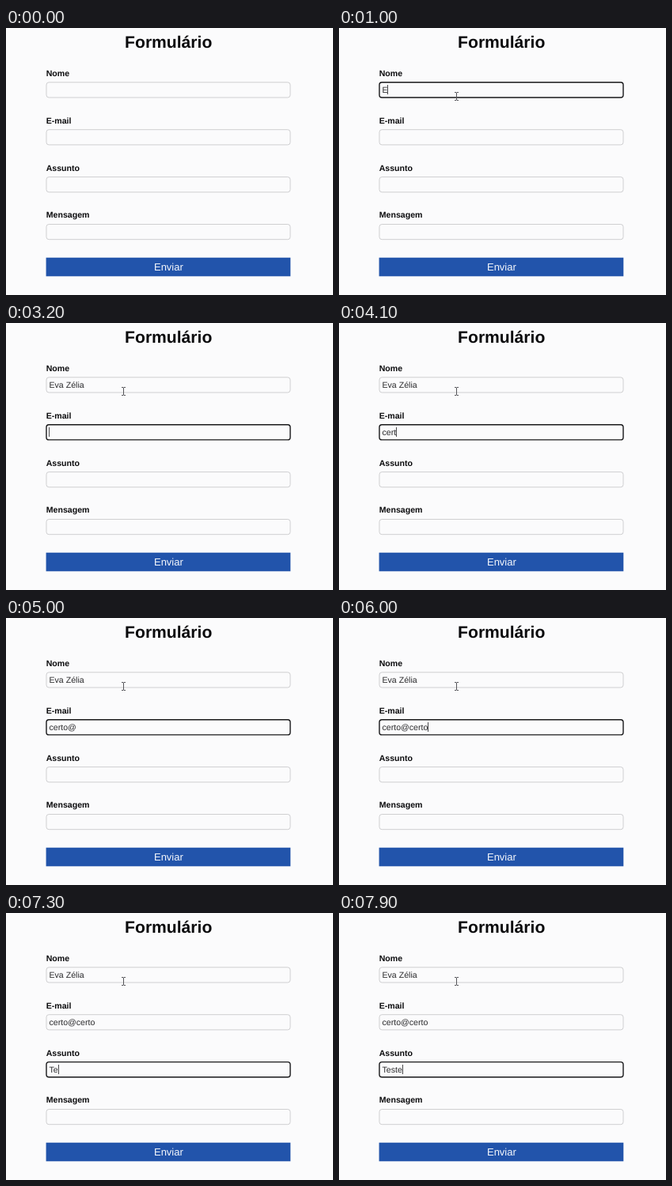
These frames come from a looping animation (413x338 px, 8000 ms). An HTML page:

```html
<!DOCTYPE html>
<html lang="pt-BR">
<head>
<meta charset="utf-8">
<title>Formulário</title>
<style>
  html, body { margin: 0; width: 100%; height: 100%; overflow: hidden; background: #fbfbfc; }
  svg { display: block; width: 413px; height: 338px; font-family: "Liberation Sans", Arial, sans-serif; text-rendering: geometricPrecision; }
  .title { font-size: 21.1px; font-weight: bold; text-anchor: middle; fill: #0a0a0c; }
  .label { font-size: 10.6px; font-weight: bold; fill: #0c0c0e; }
  .value { font-size: 10.6px; fill: #2a2a2c; white-space: pre; }
  .button { font-size: 13px; text-anchor: middle; fill: #f4f7fc; }
  .box { fill: none; stroke: #cfcfd1; stroke-width: 1; }
  .box.focus { stroke: #18181a; stroke-width: 1.4; }
</style>
</head>
<body>
<svg id="stage" viewBox="0 0 413 338">
  <text class="title" x="205.2" y="25">Formulário</text>
  <g id="fields"></g>
  <rect x="50.6" y="290.7" width="308.7" height="23.6" fill="#2254ab"/>
  <text class="button" x="205.4" y="307">Enviar</text>
  <rect id="caret" width="1" height="12" fill="#48484b"/>
  <path id="pointer" d="M146 81.5h2l.5.5.5-.5h2M148.5 82v9M146 91.5h2l.5-.5.5.5h2" fill="none" stroke="#55555a"/>
</svg>
<script>
const LOOP = 8000, BLINK = 500, LEFT = 54.5;
const labels = ["Nome", "E-mail", "Assunto", "Mensagem"];

// Each step: [time, field, value]; an empty value marks the moment of focus.
const steps = [[200, 0, ""]];
const type = (field, states, times) =>
  states.forEach((s, i) => steps.push([times[i], field, s]));
const prefixes = word => [...word].map((_, i) => word.slice(0, i + 1));

const name = prefixes("Eva Zélia");
name.splice(5, 0, "Eva Z´"); // pending accent before the vowel
type(0, name, [1000, 1200, 1400, 1700, 1900, 2300, 2500, 2700, 2800, 2900]);
steps.push([3100, 1, ""]);
type(1, prefixes("certo@certo"),
  [3400, 3600, 3800, 4000, 4200, 4400, 5200, 5400, 5600, 5800, 6000]);
steps.push([6500, 2, ""]);
type(2, prefixes("Teste"), [7000, 7200, 7400, 7600, 7700]);

const $ = id => document.getElementById(id);
function add(tag, attrs, text = "") {
  const el = document.createElementNS("http://www.w3.org/2000/svg", tag);
  for (const key in attrs) el.setAttribute(key, attrs[key]);
  el.textContent = text;
  $("fields").append(el);
  return el;
}

const fields = labels.map((label, i) => {
  const y = i * 59.9;
  add("text", { class: "label", x: 50.7, y: 61 + i * 59.8 }, label);
  return {
    y,
    box: add("rect", { class: "box", x: 51, y: y + 68.8, width: 308, height: 19.2, rx: 3.2 }),
    value: add("text", { class: "value", x: LEFT, y: y + 82 })
  };
});

function draw(t) {
  const values = labels.map(() => "");
  let active = -1, last = 0;
  for (const [time, field, text] of steps) {
    if (time > t) break;
    values[field] = text;
    active = field;
    last = time;
  }
  fields.forEach((f, i) => {
    if (f.value.textContent !== values[i]) f.value.textContent = values[i];
    f.box.setAttribute("class", i === active ? "box focus" : "box");
  });
  const caretOn = active >= 0 && Math.floor((t - last) / BLINK) % 2 === 0;
  $("caret").style.display = caretOn ? "" : "none";
  if (caretOn) {
    const f = fields[active];
    const width = values[active] ? f.value.getComputedTextLength() : 0;
    $("caret").setAttribute("x", Math.round(LEFT + width - 0.2));
    $("caret").setAttribute("y", Math.round(f.y) + 72);
  }
  $("pointer").style.display = t >= 100 ? "" : "none";
}

const start = performance.now();
function tick() {
  draw((performance.now() - start) % LOOP);
  requestAnimationFrame(tick);
}
tick();
</script>
</body>
</html>
```
